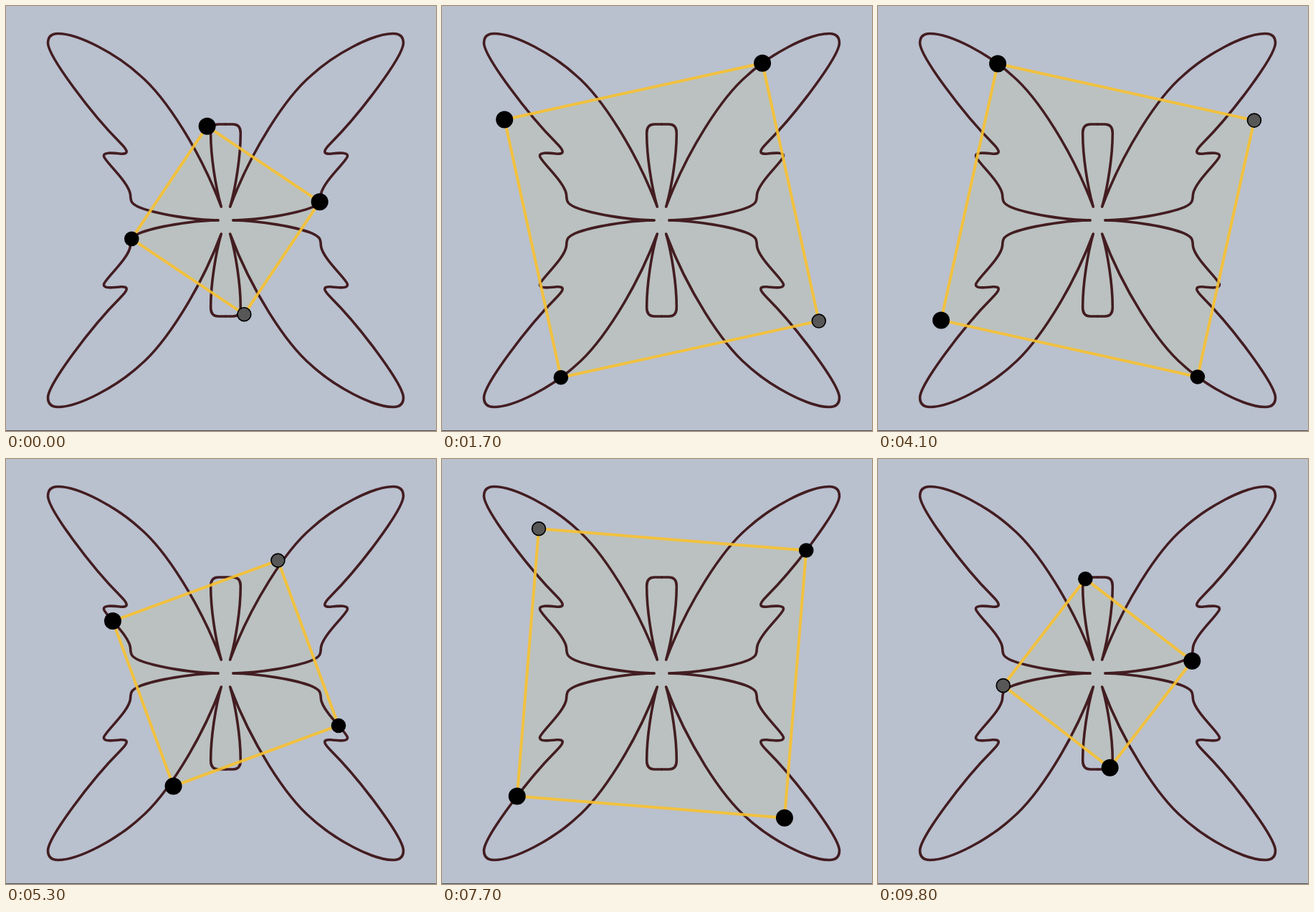
These frames come from a looping animation (600 by 593 pixels, 9900 ms). An HTML page:

```html
<!DOCTYPE html>
<html lang="en">
<head>
<meta charset="utf-8">
<title>Square riding a butterfly curve</title>
<style>
  html, body { margin: 0; height: 100%; overflow: hidden; background: #b9c0ce; }
  svg { display: block; }
  .area { fill: #bac1c0; }
  .curve { fill: none; stroke: #431d21; stroke-width: 3.6; stroke-linecap: round; stroke-linejoin: round; }
  .edge { fill: none; stroke: #fac22d; stroke-opacity: .88; stroke-width: 4; stroke-linejoin: round; }
  .tail { fill: #575757; stroke: #000; stroke-width: 1.7; }
</style>
</head>
<body>
<svg width="600" height="593">
  <!-- Origin at the centre of the square, y pointing up -->
  <g transform="translate(306.5 299) scale(1 -1)">
    <polygon class="area"/>
    <g class="curve">
      <!-- One quarter: lower wing edge, notch, wing tip, upper wing edge, body -->
      <path id="quarter" d="M10.5 0
        C48 .5 98 9 121 18.3 C132.5 23.5 132.5 27 133 36
        C135 53 168.5 82 169.8 89 C171.5 95 160 94.5 146 92.8
        C135 92.5 136 97 147 108 C188 149 247 228 248 247
        C248 256 243 260.5 234 260.5 C205 260.5 152 232 119.3 202
        C84 172 36 98 6.2 19
        C14 46 21 90 20.8 122 C20.8 130 17 134 10 134 H0"/>
      <use href="#quarter" transform="scale(-1 1)"/>
      <use href="#quarter" transform="scale(1 -1)"/>
      <use href="#quarter" transform="scale(-1 -1)"/>
    </g>
    <polygon class="edge"/>
    <circle class="dot" r="12"/>
    <circle class="dot" r="12"/>
    <circle class="dot" r="10.3"/>
    <circle class="dot tail" r="9.45"/>
  </g>
  <rect y="592" width="600" height="1" fill="#4a4c52"/>
</svg>
<script>
const LOOP = 9900, STEP = 100;
const START_ANGLE = 11.15, TURN_PER_STEP = 2.717; // degrees

const quarter = document.getElementById('quarter');
const squares = document.querySelectorAll('polygon');
const dots = document.querySelectorAll('.dot');
const length = quarter.getTotalLength();

// The polar angle grows along the quarter, so bisection finds the point at a given angle.
function radius(angle) {
  const folded = Math.atan2(Math.abs(Math.sin(angle)), Math.abs(Math.cos(angle)));
  let low = 0, high = length, point;
  for (let i = 0; i < 24; i++) {
    const middle = (low + high) / 2;
    point = quarter.getPointAtLength(middle);
    if (Math.atan2(point.y, point.x) < folded) low = middle;
    else high = middle;
  }
  return Math.hypot(point.x, point.y);
}

function draw(time) {
  const step = Math.floor(time % LOOP / STEP);
  const angle = (START_ANGLE + TURN_PER_STEP * step) * Math.PI / 180;
  const r = radius(angle);
  const corners = [...dots].map((dot, k) => {
    const a = angle + k * Math.PI / 2;
    const x = r * Math.cos(a), y = r * Math.sin(a);
    dot.setAttribute('cx', x);
    dot.setAttribute('cy', y);
    return [x, y];
  });
  squares.forEach(square => square.setAttribute('points', corners.join(' ')));
}

const start = performance.now();
function tick() {
  draw(performance.now() - start);
  requestAnimationFrame(tick);
}
tick();
</script>
</body>
</html>
```
